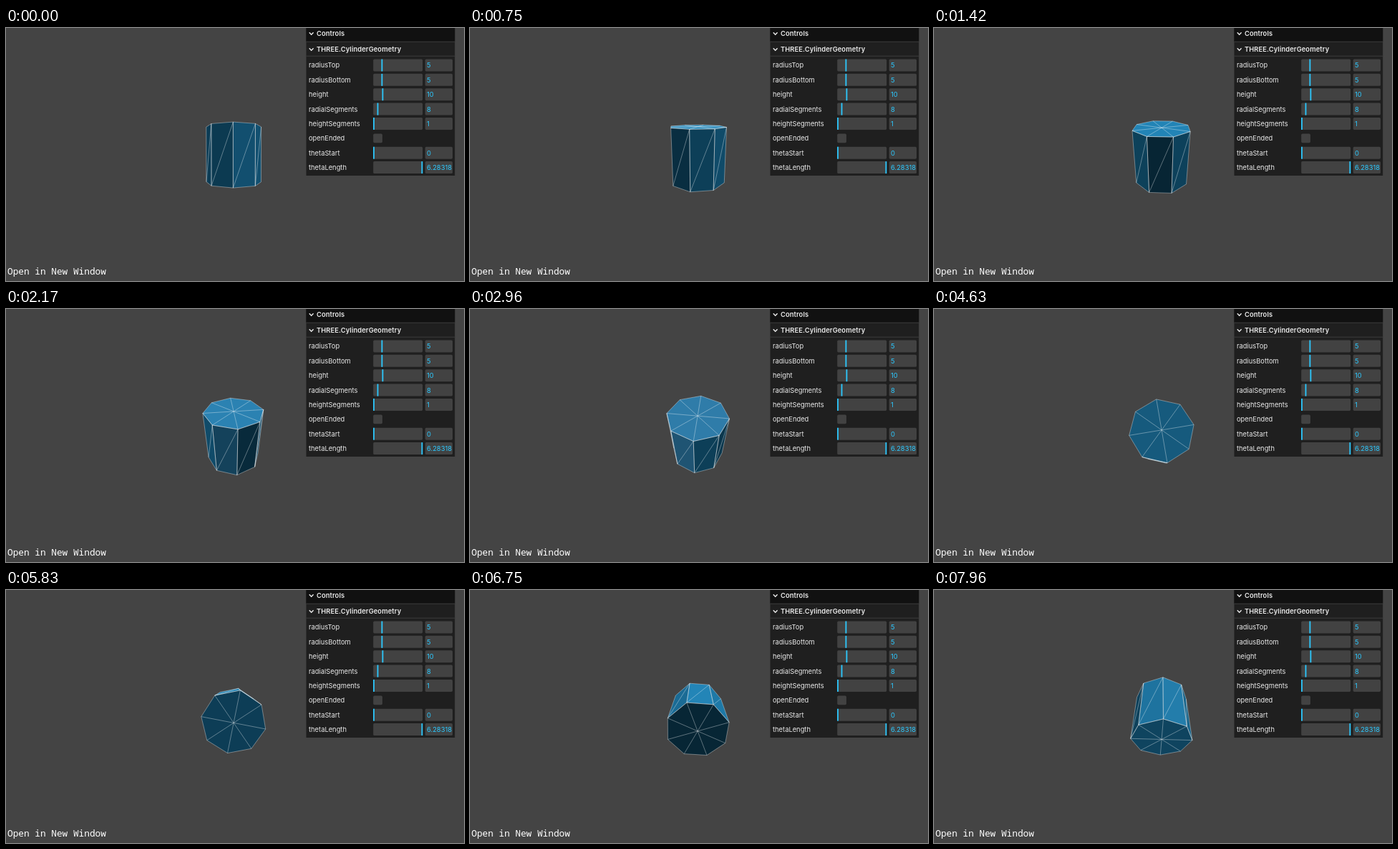
These frames come from a looping animation (640x353 px, 8 s). An HTML page with a canvas:

```html
<!DOCTYPE html>
<html lang="en">
<head>
<meta charset="utf-8">
<title>Cylinder geometry</title>
<style>
  html, body { margin: 0; width: 100%; height: 100%; overflow: hidden; background: #444; }
  canvas, svg { position: absolute; left: 0; top: 0; }
  text { font: 9.35px Inter, sans-serif; fill: #ebebeb; }
  .title { font-weight: 600; letter-spacing: .1px; }
  .value { fill: #2cc9ff; }
  .link { font: 12.78px "Noto Sans Mono", monospace; fill: #fff; }
  .widget { fill: #424242; }
  .chevron { fill: none; stroke: #ebebeb; stroke-width: 1.4; }
</style>
</head>
<body>
<canvas id="stage" width="640" height="353"></canvas>
<svg id="panel" width="640" height="353"></svg>
<script>
// ---- control panel ----
// label, value, x of the slider mark
const rows = [
  ['radiusTop', '5', 525.4],
  ['radiusBottom', '5', 525.4],
  ['height', '10', 526.4],
  ['radialSegments', '8', 519.5],
  ['heightSegments', '1', 514],
  ['openEnded'],
  ['thetaStart', '0', 514],
  ['thetaLength', '6.28318', 581.4]
];

const widget = (x, y, w, h) =>
  `<rect class="widget" x="${x}" y="${y}" width="${w}" height="${h}" rx="1.7"/>`;

const title = (label, y) =>
  `<path class="chevron" d="M423.8 ${y - 1.5}l2.9 3l2.9 -3"/>
   <text class="title" x="434" y="${y + 3.4}">${label}</text>`;

function row([label, value, mark], i) {
  const y = 52 + i * 20.37;
  const text = `<text x="423" y="${y + 3.4}">${label}</text>`;
  if (value === undefined) return text + widget(513.2, y - 6.4, 12.75, 12.75);
  return text + widget(513.2, y - 8.5, 69, 17) + widget(585.7, y - 8.5, 38.3, 17) +
    `<rect x="${mark - .9}" y="${y - 8.5}" width="1.8" height="17" fill="#2cc9ff"/>
     <text class="value" x="588" y="${y + 3.4}" clip-path="url(#fields)">${value}</text>`;
}

document.getElementById('panel').innerHTML =
  `<clipPath id="fields"><rect x="586" width="38" height="353"/></clipPath>
   <rect x="419.5" width="207.7" height="206" fill="#1f1f1f"/>
   <rect x="419.5" width="207.7" height="18.8" fill="#111"/>
   <path d="M419.5 19.2h207.7M419.5 39.2h207.7" stroke="#424242" stroke-width=".85"/>` +
  title('Controls', 7.8) + title('THREE.CylinderGeometry', 29.8) +
  rows.map(row).join('') +
  '<text class="link" x="2" y="344">Open in New Window</text>';

// ---- cylinder ----
const ctx = document.getElementById('stage').getContext('2d');
const RADIUS = 5, HALF = 5, SEGMENTS = 8, CAMERA = [0, 0, 30];
const FOCAL = 353 / 2 / Math.tan(37.5 * Math.PI / 180);
const LOOP = 8000, FRAME = 1000 / 24;

const dot = (a, b) => a[0] * b[0] + a[1] * b[1] + a[2] * b[2];
const sub = (a, b) => a.map((v, i) => v - b[i]);
const unit = a => a.map(v => v / Math.hypot(...a));
const toLinear = v => v <= .04045 ? v / 12.92 : ((v + .055) / 1.055) ** 2.4;
const toSrgb = v => v <= .0031308 ? v * 12.92 : 1.055 * v ** (1 / 2.4) - .055;
const linear = (...rgb) => rgb.map(v => toLinear(v / 255));

const diffuse = linear(0x15, 0x62, 0x89);
const emissive = linear(0x07, 0x25, 0x34);
const lights = [[0, 1, 0], [1, 2, 1], [-1, -2, -1]].map(unit);

// Phong shading with three directional lights of intensity 3
function shade(normal, center) {
  const view = unit(sub(CAMERA, center));
  let matte = 0, gloss = 0;
  for (const light of lights) {
    const facing = Math.max(0, dot(normal, light));
    const half = unit(light.map((v, i) => v + view[i]));
    matte += facing * 3 / Math.PI;
    gloss += facing * .0214 * Math.max(0, dot(normal, half)) ** 30;
  }
  const rgb = diffuse.map((d, i) =>
    Math.round(255 * Math.min(1, toSrgb(emissive[i] + d * matte + gloss))));
  return `rgb(${rgb})`;
}

function project([x, y, z]) {
  const scale = FOCAL / (CAMERA[2] - z);
  return [318.1 + x * scale, 176.5 - y * scale];
}

function draw(time) {
  const angle = Math.PI + .016 + time * .0003;
  const sin = Math.sin(angle), cos = Math.cos(angle);

  // a point in cylinder coordinates, turned about y and then about x
  const place = (step, radius, y) => {
    const theta = step * 2 * Math.PI / SEGMENTS + angle;
    const z = radius * Math.cos(theta);
    return [radius * Math.sin(theta), y * cos - z * sin, y * sin + z * cos];
  };
  const wires = new Path2D();
  const line = (a, b) => {
    wires.moveTo(...project(a));
    wires.lineTo(...project(b));
  };
  const face = (points, normal, center) => {
    if (dot(normal, sub(CAMERA, center)) <= 0) return false;
    ctx.beginPath();
    points.forEach(p => ctx.lineTo(...project(p)));
    ctx.closePath();
    ctx.fillStyle = shade(normal, center);
    ctx.fill();
    points.forEach((p, i) => line(p, points[(i + 1) % points.length]));
    return true;
  };

  ctx.fillStyle = '#444';
  ctx.fillRect(0, 0, 640, 353);

  const steps = [...Array(SEGMENTS).keys()];
  for (const i of steps) {
    const [a, d] = [i, i + 1].map(s => place(s, RADIUS, HALF));
    const [b, c] = [i, i + 1].map(s => place(s, RADIUS, -HALF));
    const inner = RADIUS * Math.cos(Math.PI / SEGMENTS);
    if (face([a, b, c, d], place(i + .5, 1, 0), place(i + .5, inner, 0))) line(b, d);
  }
  for (const side of [1, -1]) {
    const rim = steps.map(i => place(i, RADIUS, side * HALF));
    const hub = place(0, 0, side * HALF);
    if (face(rim, place(0, 0, side), hub)) rim.forEach(p => line(hub, p));
  }

  ctx.strokeStyle = 'rgba(255,255,255,.5)';
  ctx.lineWidth = .7;
  ctx.stroke(wires);
}

function tick() {
  const time = performance.now() % LOOP;
  draw(Math.floor((time + 5) / FRAME) * FRAME);
  requestAnimationFrame(tick);
}
tick();
</script>
</body>
</html>
```
